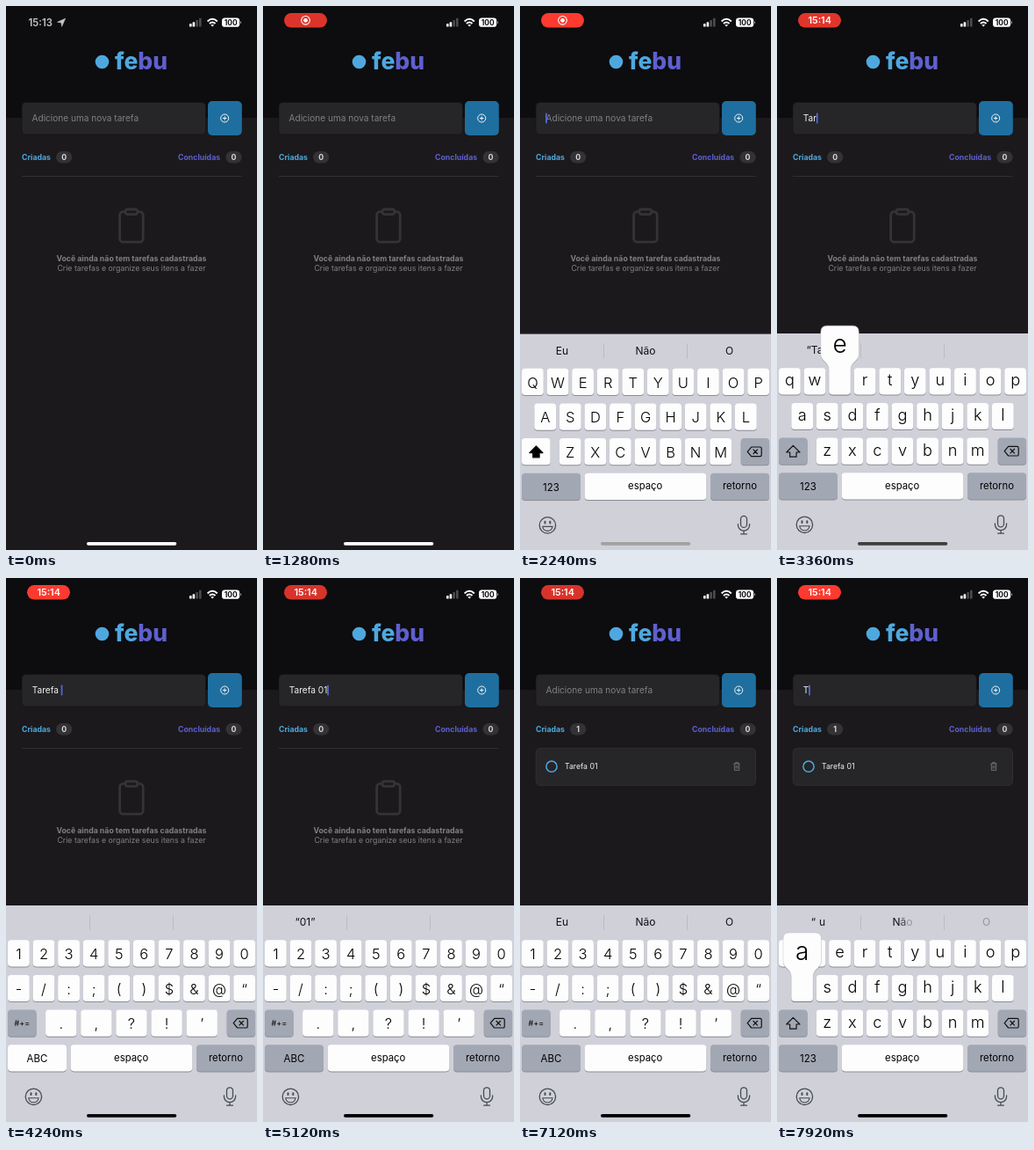
These frames come from a looping animation (286 by 618 pixels, 8 s). An HTML page:

```html
<!DOCTYPE html>
<html lang="pt-BR">
<head>
<meta charset="utf-8">
<title>Lista de tarefas</title>
<style>
  html, body { margin: 0; width: 100%; height: 100%; overflow: hidden; background: #1b191c; }
  svg { display: block; width: 100%; height: 100%; font-family: Inter, "Open Sans", sans-serif; }
  text { white-space: pre; }
  .mid { text-anchor: middle; }
  .bold { font-weight: 700; font-size: 8.75px; }
</style>
</head>
<body>
<svg viewBox="0 0 286 618" preserveAspectRatio="none">
  <rect width="286" height="618" fill="#1b191c"/>
  <rect width="286" height="127" fill="#0d0c0f"/>

  <g id="clock" fill="#c6c6c8">
    <text x="25.6" y="23" font-size="11.3" font-weight="600">15:13</text>
    <path d="M67.6 14.2 L58.6 18.3 L63 18.9 L63.6 23.3 Z" stroke="#c6c6c8" stroke-width=".6" stroke-linejoin="round"/>
  </g>
  <g id="pill">
    <rect id="pillBg" x="24" y="8" width="49" height="16.6" rx="8.3" fill="#ff3b30"/>
    <g id="recIcon" fill="#fff">
      <circle cx="48.5" cy="16.3" r="4.8" fill="none" stroke="#fff" stroke-width="1.1"/>
      <circle cx="48.5" cy="16.3" r="2.4"/>
    </g>
    <text id="pillTime" class="mid" x="48.7" y="20.2" font-size="10.8" font-weight="600" fill="#fff">15:14</text>
  </g>

  <g fill="#fff">
    <rect x="209" y="20" width="2.6" height="3.6" rx=".7"/>
    <rect x="212.6" y="18.2" width="2.6" height="5.4" rx=".7"/>
    <rect x="216.3" y="16" width="2.6" height="7.6" rx=".7" fill="#4c4b4e"/>
    <rect x="220" y="13.8" width="2.6" height="9.8" rx=".7" fill="#4c4b4e"/>
    <g fill="none" stroke="#fff" stroke-width="2">
      <path d="M229.6 17.4 Q235.2 12.2 240.8 17.4"/>
      <path d="M231.9 19.9 Q235.2 17 238.5 19.9"/>
    </g>
    <path d="M233.3 21.6 Q235.2 20.2 237.1 21.6 L235.2 23.6 Z"/>
    <rect x="246" y="13.5" width="20.2" height="10.3" rx="3.4"/>
    <path d="M267 17 Q268.6 18.6 267 20.4 Z"/>
    <text class="mid" x="256.1" y="21.6" font-size="8.3" font-weight="700" fill="#0d0c0f">100</text>
  </g>

  <circle cx="109.5" cy="63.5" r="7.8" fill="#4ea8de"/>
  <text x="124" y="71.5" font-size="26.5" font-weight="800" fill="#4ea8de">fe<tspan fill="#5e60ce">bu</tspan></text>

  <rect x="18" y="109.5" width="209.5" height="36.5" rx="4.5" fill="#262528" stroke="#151417" stroke-width=".7"/>
  <text id="hint" x="29.5" y="131.2" font-size="10.1" fill="#807f83">Adicione uma nova tarefa</text>
  <text id="entry" x="29.8" y="131.2" font-size="10.1" fill="#f2f2f2"></text>
  <rect id="caret" y="121.5" width="1.8" height="12" rx=".8" fill="#5068d2"/>
  <g id="add">
    <rect x="230" y="108" width="38.8" height="39" rx="5" fill="#1e6f9f"/>
    <g fill="none" stroke="#f2f2f2" stroke-width="1">
      <circle cx="249.2" cy="127.5" r="4.5"/>
      <path d="M247 127.5 h4.4 M249.2 125.3 v4.4"/>
    </g>
  </g>

  <g class="bold">
    <text x="18" y="174.7" fill="#4ea8de">Criadas</text>
    <text x="196" y="174.7" fill="#5e60ce">Concluídas</text>
    <rect x="57" y="165" width="18.3" height="13.4" rx="6.7" fill="#333235"/>
    <rect x="250.4" y="165" width="18.3" height="13.4" rx="6.7" fill="#333235"/>
    <text id="made" class="mid" x="66.1" y="174.8" fill="#d9d9d9">0</text>
    <text class="mid" x="259.5" y="174.8" fill="#d9d9d9">0</text>
  </g>

  <g id="empty">
    <path d="M18 193.5 H268.5" stroke="#333235" stroke-width=".9"/>
    <g fill="none" stroke="#343336" stroke-width="2.8" stroke-linejoin="round">
      <rect x="129.6" y="233.6" width="26.6" height="34.6" rx="4"/>
      <rect x="136" y="231" width="13.8" height="5.6" rx="2.6" fill="#1b191c"/>
    </g>
    <text class="bold mid" x="143" y="290.3" fill="#808083">Você ainda não tem tarefas cadastradas</text>
    <text class="mid" x="143" y="301" font-size="8.75" fill="#808083">Crie tarefas e organize seus itens a fazer</text>
  </g>
  <g id="card">
    <rect x="18.2" y="193.4" width="250.3" height="42.2" rx="5" fill="#262528" stroke="#343336" stroke-width=".8"/>
    <circle cx="36" cy="214.2" r="6.1" fill="none" stroke="#4ea8de" stroke-width="1.5"/>
    <text x="51" y="217.3" font-size="8.7" fill="#f2f2f2">Tarefa 01</text>
    <path d="M243.4 211 h7.2 M245.6 211 v-1.4 h2.8 v1.4 M244.3 211 v7.4 h5.4 V211 M246.1 213 v3.6 M247.9 213 v3.6"
      fill="none" stroke="#807f83" stroke-width=".8"/>
  </g>

  <g id="board">
    <rect y="372" width="286" height="500" fill="#cfd0d8"/>
    <path d="M95.5 383 v17 M190.5 383 v17" stroke="#b5b7bf" stroke-width=".8"/>
    <g id="words" class="mid" font-size="12" fill="#111"></g>
    <g id="keys"></g>
    <g id="press"></g>
    <g fill="none" stroke="#484b52" stroke-width="1.3" stroke-linecap="round">
      <circle cx="31.4" cy="589.3" r="9.2"/>
      <path d="M25.8 590.8 h11.2 q-.8 5 -5.6 5 t-5.6 -5 Z" stroke-width="1.1"/>
      <path d="M28.5 585.2 v1.8 M34.3 585.2 v1.8" stroke-width="2"/>
      <rect x="251.5" y="578.8" width="7" height="13" rx="3.5"/>
      <path d="M248.4 588 v1 a6.6 6.6 0 0 0 13.2 0 v-1 M255 595.8 v3.4 M251.6 599.2 h6.8"/>
    </g>
  </g>
  <rect id="home" x="92" y="609" width="102.3" height="3.7" rx="1.85"/>
</svg>

<script>
const LOOP = 8000;
const $ = id => document.getElementById(id);
const clamp = v => Math.max(0, Math.min(1, v));
const ramp = (t, a, b) => clamp((t - a) / (b - a));
const show = (id, on) => $(id).setAttribute('visibility', on ? 'visible' : 'hidden');
const fade = (id, v) => $(id).setAttribute('opacity', v.toFixed(3));

// Touches: time down, time up, key
const touches = [
  [2640, 2740, 'T'], [2880, 2970, 'a'], [3100, 3190, 'r'], [3320, 3410, 'e'],
  [3580, 3670, 'f'], [3800, 3890, 'a'], [4030, 4110, ' '], [4240, 4330, '123'],
  [4520, 4620, '0'], [4800, 4900, '1'],
  [7240, 7330, 'ABC'], [7700, 7800, 'T'], [7880, 7990, 'a']
];
const FOCUS = 1774, ADDED = 6320;
const DARK = '#a2a8b3', LIGHT = '#fdfdfe';
const PITCH = 28.58, KEY_W = 24.8, KEY_H = 30.2;
const rowY = [411.2, 450.9, 490.5, 530.2];

const label = (x, y, size, s, extra = '') =>
  `<text class="mid" x="${x}" y="${y}" font-size="${size}" ${extra}>${s}</text>`;
const cap = (x, y, w, fill) =>
  `<rect x="${x}" y="${y + 1}" width="${w}" height="${KEY_H}" rx="3.8" fill="#8b8d94"/>` +
  `<rect x="${x}" y="${y}" width="${w}" height="${KEY_H}" rx="3.8" fill="${fill}"/>`;

const isLow = c => /[a-z]/.test(c);
const rowKeys = (chars, row, first, pitch = PITCH, w = KEY_W) =>
  [...chars].map((c, i) => ({ c, x: first + i * pitch, y: rowY[row], w }));

function charKeys(kind) {
  if (kind === 'num') return [
    ...rowKeys('1234567890', 0, 14.4),
    ...rowKeys('-/:;()$&@“', 1, 14.4),
    ...rowKeys('.,?!’', 2, 62.8, 40.1, 35.4)
  ];
  const set = s => kind === 'low' ? s : s.toUpperCase();
  return [
    ...rowKeys(set('qwertyuiop'), 0, 14.4),
    ...rowKeys(set('asdfghjkl'), 1, 28.7),
    ...rowKeys(set('zxcvbnm'), 2, 57.2)
  ];
}

const arrow = 'M18.4 499.4 L26 507 H22.1 V512.2 H14.7 V507 H10.8 Z';
const eraser = 'M263.6 500.4 H273.6 Q275.2 500.4 275.2 502 V509.4 Q275.2 511 273.6 511 H263.6 L259.2 505.7 Z M265.6 503 l5.2 5.4 M270.8 503 l-5.2 5.4';

function keysMarkup(kind, down) {
  const num = kind === 'num', up = kind === 'up';
  let s = charKeys(kind).map(k => cap(k.x - k.w / 2, k.y, k.w, LIGHT) +
    label(k.x, k.y + (isLow(k.c) ? 20 : 21.7), isLow(k.c) ? 18.2 : 16.5, k.c, 'font-weight="350"')).join('');
  s += cap(2, rowY[2], 32.6, up ? LIGHT : DARK);
  s += num ? label(18.3, 509, 9, '#+=')
    : `<path d="${arrow}" fill="${up ? '#000' : 'none'}" stroke="#111" stroke-width="1.2" stroke-linejoin="round"/>`;
  s += cap(251.7, rowY[2], 32.4, DARK) +
    `<path d="${eraser}" fill="none" stroke="#111" stroke-width="1.2" stroke-linejoin="round"/>`;
  s += cap(2, rowY[3], 67, down === '123' || down === 'ABC' ? LIGHT : DARK) + label(35.5, 549.9, 11.5, num ? 'ABC' : '123');
  s += cap(73.7, rowY[3], 138.6, down === ' ' ? DARK : LIGHT) + label(142.7, 548.8, 11.3, 'espaço');
  s += cap(217, rowY[3], 67, DARK) + label(250.5, 548.8, 11.3, 'retorno');
  return s;
}

// Enlarged key: bubble narrowing down to the key itself
function popup(k) {
  const l = k.x - k.w / 2, r = k.x + k.w / 2, top = k.y - 48, end = k.y + KEY_H;
  const a = Math.max(2, Math.min(240.6, k.x - 21.7)), b = a + 43.4;
  const d = `M${a + 7} ${top} H${b - 7} Q${b} ${top} ${b} ${top + 7} V${top + 32}
    C${b} ${top + 41} ${r} ${top + 40} ${r} ${top + 51} V${end - 4} Q${r} ${end} ${r - 4} ${end}
    H${l + 4} Q${l} ${end} ${l} ${end - 4} V${top + 51}
    C${l} ${top + 40} ${a} ${top + 41} ${a} ${top + 32} V${top + 7} Q${a} ${top} ${a + 7} ${top} Z`;
  return `<path d="${d}" transform="translate(0 1)" fill="#000" opacity=".2"/>` +
    `<path d="${d}" fill="${LIGHT}" stroke="#b9bbc2" stroke-width=".4"/>` +
    label((a + b) / 2, k.y - (isLow(k.c) ? 17.2 : 15), 28, k.c, 'font-weight="300"');
}

const spans = (s, alpha) => [...s].map((c, i) =>
  `<tspan fill-opacity="${clamp(alpha(i, s.length)).toFixed(2)}">${c}</tspan>`).join('');

// Suggestions; the first letter typed dissolves the defaults glyph by glyph
function wordsMarkup(text, since) {
  const at = (x, s) => `<text x="${x}" y="395.4">${s}</text>`;
  if (!text) return at(48, 'Eu') + at(143, 'Não') + at(238.5, 'O');
  const word = text.split(' ').pop();
  if (!word) return '';
  const p = text.length === 1 ? clamp(since / 280) : 1;
  let s = at(48, spans(`“${word}”`, i => p === 1 ? 1 : 2.3 * p - i));
  if (p < 1) {
    const tail = (i, n) => 1.16 - 2 * p + .4 * (n - 1 - i);
    s += at(48, spans('Eu', i => 1 + i - 2.4 * p)) + at(143, spans('Não', tail)) + at(238.5, spans('O', tail));
  }
  return s;
}

function stateAt(t) {
  let text = '', kind = 'up', edited = FOCUS, down = null;
  for (const [a, b, key] of touches) {
    if (t < a) break;
    if (a > ADDED && text.length > 2) { text = ''; edited = ADDED; }
    if (t < b) down = key;
    if (key === '123') kind = 'num';
    else if (key === 'ABC') kind = 'up';
    else if (t >= b) {
      text += key;
      edited = b;
      if (kind === 'up') kind = 'low';
    }
  }
  if (t >= ADDED && text.length > 2) { text = ''; edited = ADDED; }
  return { text, kind, edited, down };
}

const homeStops = [[1800, 255], [1940, 182], [2240, 162], [3360, 62], [4400, 0]];
function homeShade(t) {
  let v = 255;
  homeStops.forEach(([a, s], i) => {
    const next = homeStops[i + 1];
    if (t >= a) v = next ? s + (next[1] - s) * ramp(t, a, next[0]) : s;
  });
  return Math.round(v);
}

let lastKeys = '';
function draw(t) {
  const { text, kind, edited, down } = stateAt(t);
  const added = t >= ADDED;

  const pill = ramp(t, 400, 640);
  fade('clock', 1 - pill);
  fade('pill', pill);
  fade('pillBg', .92 + .08 * Math.cos((t - 2080) / 1000 * Math.PI));
  const swap = ramp(t, 2800, 3000);
  fade('recIcon', 1 - swap);
  fade('pillTime', swap);

  show('hint', !text);
  $('entry').textContent = text;
  const end = text ? 29.6 + $('entry').getComputedTextLength() : 29;
  $('caret').setAttribute('x', end);
  show('caret', t >= FOCUS && (t - edited) % 1050 < 640);

  fade('add', 1 - .8 * (ramp(t, 5980, 6130) - ramp(t, 6220, 6450)));
  $('made').textContent = added ? 1 : 0;
  show('empty', !added);
  show('card', added);

  // Critically damped slide
  const w = Math.max(0, t - FOCUS) * .0176;
  const gap = t < FOCUS ? 260 : 246 * (1 + w) * Math.exp(-w);
  $('board').setAttribute('transform', `translate(0 ${gap.toFixed(2)})`);

  const id = kind + down;
  if (id !== lastKeys) {
    lastKeys = id;
    $('keys').innerHTML = keysMarkup(kind, down);
    const hit = charKeys(kind).find(k => k.c === down);
    $('press').innerHTML = hit ? popup(hit) : '';
  }
  $('words').innerHTML = wordsMarkup(text, t - edited);

  const g = homeShade(t);
  $('home').setAttribute('fill', `rgb(${g},${g},${g})`);
}

const start = performance.now();
function tick() {
  draw((performance.now() - start) % LOOP);
  requestAnimationFrame(tick);
}
tick();
</script>
</body>
</html>
```
